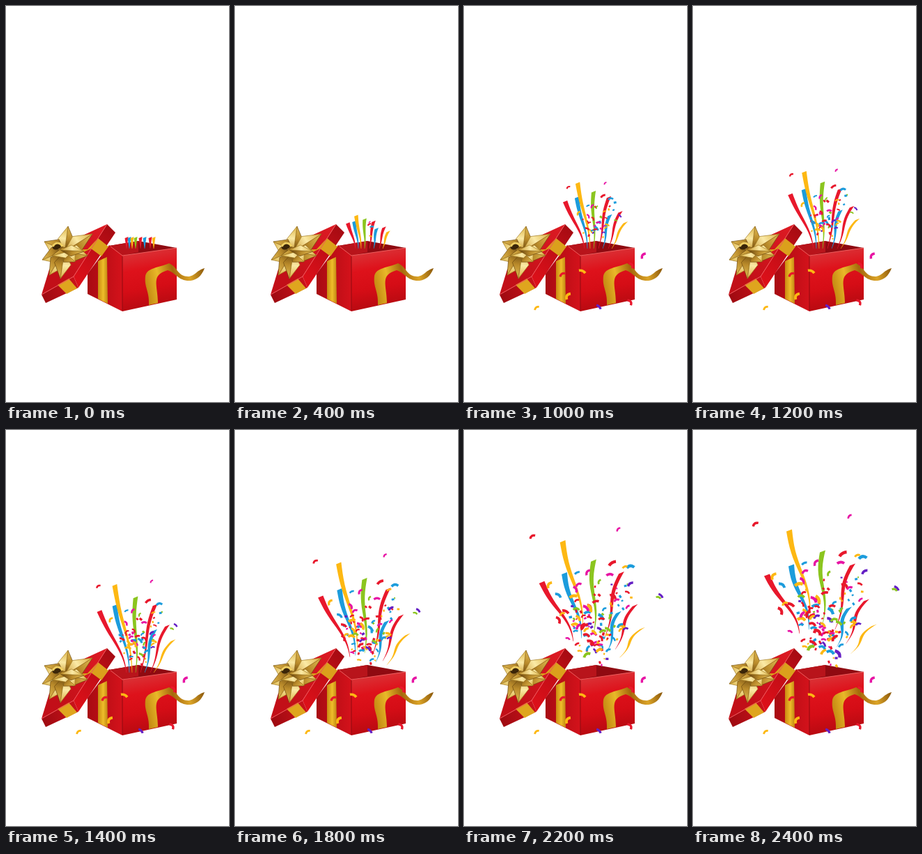
An HTML page with a canvas for the animation above (2600 ms loop, 320x568 px).

```html
<!DOCTYPE html>
<html lang="en">
<head>
<meta charset="utf-8">
<title>Gift box confetti</title>
<style>
html, body { margin: 0; width: 100%; height: 100%; overflow: hidden; background: #fff; }
canvas { display: block; }
</style>
</head>
<body>
<canvas id="stage" width="320" height="568"></canvas>
<script>
const ctx = document.getElementById('stage').getContext('2d');
const STEP = 200, STEPS = 13, LAST = STEPS - 1;
const MOUTH = { x: 188, y: 340 };
const RED = '#e8182c', YELLOW = '#fdb813', GREEN = '#8bc51f', BLUE = '#1c9cdc', PINK = '#e714a4', VIOLET = '#641fc4';
const PAPER = [RED, YELLOW, BLUE, PINK, RED, GREEN, YELLOW, RED, BLUE, PINK, VIOLET];

const mix = (a, b, u) => a + (b - a) * u;
const rnd = n => { const v = Math.sin(n * 12.9898) * 43758.5453; return v - Math.floor(v); };

function poly(fill, pts, line) {
  ctx.beginPath();
  for (let i = 0; i < pts.length; i += 2) ctx.lineTo(pts[i], pts[i + 1]);
  ctx.closePath();
  ctx.fillStyle = fill;
  ctx.fill();
  if (line) { ctx.strokeStyle = line; ctx.lineWidth = 0.7; ctx.stroke(); }
}

function edge(color, ...pts) {
  ctx.beginPath();
  for (let i = 0; i < pts.length; i += 2) ctx.lineTo(pts[i], pts[i + 1]);
  ctx.strokeStyle = color;
  ctx.lineWidth = 1;
  ctx.stroke();
}

function shade(x0, y0, x1, y1, ...stops) {
  const g = ctx.createLinearGradient(x0, y0, x1, y1);
  stops.forEach((c, i) => g.addColorStop(i / (stops.length - 1), c));
  return g;
}

function drawBox() {
  poly('#8f0a11', [148, 344, 190, 337, 245, 347, 167, 359]);
  poly('#b8141b', [148, 344, 190, 337, 190, 353, 167, 358]);
  poly(shade(117, 0, 167, 0, '#a80b12', '#d4121b'), [148, 343, 167, 358, 167, 438, 117, 413, 117, 384]);
  poly(shade(190, 350, 205, 432, '#da3539', '#de121b', '#d50d16', '#b80a11'), [167, 358, 245, 347, 245, 421, 167, 438]);
  poly(shade(132, 0, 147, 0, '#c98a10', '#eebd2a', '#b97d0e'), [132, 366, 145, 360, 146, 427, 132, 420]);
  edge('#ee5d5d', 150, 345, 167, 358, 245, 347);
  edge('#8f0a10', 167, 359, 167, 437);
  // loose ribbon on the right
  ctx.beginPath();
  ctx.moveTo(205, 429);
  ctx.bezierCurveTo(206, 408, 198, 404, 200, 387);
  ctx.bezierCurveTo(203, 375, 218, 376, 234, 369);
  ctx.bezierCurveTo(248, 376, 246, 388, 262, 388);
  ctx.bezierCurveTo(272, 387, 272, 380, 285, 376);
  ctx.bezierCurveTo(280, 388, 275, 392, 265, 394);
  ctx.bezierCurveTo(247, 395, 243, 382, 232, 379);
  ctx.bezierCurveTo(207, 386, 218, 400, 218, 426);
  ctx.closePath();
  ctx.fillStyle = shade(198, 400, 285, 382, '#c08410', '#e9b929', '#a5690c', '#dca528', '#8d5a0c');
  ctx.fill();
}

function drawLid() {
  poly(shade(70, 380, 145, 330, '#c20f18', '#dc1a23'), [145, 313, 97, 388, 51, 414, 62, 378, 108, 330]);
  poly(shade(51, 414, 100, 395, '#9e0a11', '#c9121a'), [51, 414, 97, 388, 104, 404, 57, 426]);
  poly(shade(97, 390, 155, 320, '#dc1019', '#c40e17', '#a50b12'), [97, 388, 145, 313, 157, 325, 104, 404]);
  poly('#dba01c', [88, 350, 117, 349, 132, 333, 147, 345, 137, 359, 122, 348, 96, 360]);
  poly('#dfa51e', [74, 400, 90, 391, 102, 405, 87, 413]);
  edge('#f0555a', 51, 414, 97, 388, 145, 313);
}

// a folded loop: one bright facet and one shadowed facet
function petal(cx, cy, tx, ty, w) {
  const len = Math.hypot(tx - cx, ty - cy);
  const nx = -(ty - cy) / len * w, ny = (tx - cx) / len * w;
  const mx = mix(cx, tx, 0.45), my = mix(cy, ty, 0.45);
  poly(shade(cx, cy, tx, ty, '#5e3d0c', '#b98a2a', '#e3bd55'), [cx, cy, mx + nx, my + ny, tx, ty], '#6e4a0e');
  poly(shade(cx, cy, tx, ty, '#c9982f', '#fbeaa6', '#d9ae3f'), [cx, cy, mx - nx, my - ny, tx, ty], '#a37a22');
}

function drawBow() {
  const tips = [[89, 316], [55, 338], [124, 327], [52, 364], [62, 386], [78, 391], [117, 358], [99, 367]];
  for (const [x, y] of tips) petal(84, 352, x, y, 12);
  petal(98, 350, 66, 358, 8);
  petal(78, 350, 112, 352, 8);
  ctx.fillStyle = '#3a2508';
  ctx.beginPath(); ctx.ellipse(73, 344, 7, 5, -0.5, 0, 7); ctx.fill();
  ctx.strokeStyle = '#f0cf62';
  ctx.lineWidth = 3;
  ctx.beginPath(); ctx.arc(74, 347, 7, 3.4, 6); ctx.stroke();
}

// colour, base x, and where the tip ends up
const STREAMERS = [
  [RED, 173, 106, 208],
  [BLUE, 177, 141, 194],
  [YELLOW, 181, 138, 144],
  [GREEN, 186, 186, 174],
  [RED, 193, 229, 193],
  [BLUE, 199, 224, 255],
  [RED, 207, 249, 244],
  [YELLOW, 212, 260, 280]
];

function drawStreamer([color, bx, endX, endY], k) {
  const grow = k / LAST, lift = Math.max(0, (k - 7) / 5);
  const tx = mix(bx, endX, grow), ty = mix(332, endY, grow);
  const x0 = mix(bx, endX, lift * 0.3), y0 = mix(348, endY, lift * 0.4);
  const left = [], right = [];
  for (let n = 0; n <= 16; n++) {
    const v = n / 16, w = (0.5 + v * (4.5 + k * 0.25)) / 2;
    const x = mix(x0, tx, v * (0.7 + 0.3 * v)) + Math.sin(v * 6.28) * k * 0.28;
    const y = mix(y0, ty, v);
    left.push(x - w, y + w * 0.4);
    right.unshift(x + w, y - w * 0.4);
  }
  poly(color, left.concat(right));
}

function chip(i, x, y, size) {
  const s = size * mix(0.6, 1.1, rnd(i + 0.1));
  ctx.save();
  ctx.translate(x, y);
  ctx.rotate((rnd(i + 0.5) - 0.5) * 2.4);
  ctx.strokeStyle = PAPER[i % PAPER.length];
  ctx.lineWidth = s * 0.38;
  ctx.beginPath();
  ctx.moveTo(-s / 2, s * 0.14);
  ctx.quadraticCurveTo(0, -s * mix(0.1, 0.5, rnd(i + 0.7)), s / 2, s * 0.14);
  ctx.stroke();
  ctx.restore();
}

// chips leave the box one after another and keep flying outward
function drawChips(k) {
  const count = 80;
  for (let i = 0; i < count; i++) {
    const age = k - mix(1.5, LAST, i / count);
    if (age < 0) break;
    const reach = age + 1.5;
    const vx = (rnd(i + 20) + rnd(i + 140) - 1) * 11, vy = mix(5, 19, rnd(i + 260));
    chip(i, MOUTH.x + vx * reach, MOUTH.y - vy * reach, 4 + k * 0.6);
  }
}

// chips that have dropped on and around the box
const FALLEN = [[170, 380], [104, 433], [240, 372], [141, 385], [257, 358], [194, 431], [238, 425], [149, 416]];

function drawFallen(k) {
  if (k > 4) FALLEN.forEach(([x, y], i) => chip(i + (i % 3 ? 5 : 1), x, y, 11));
}

function drawSpecks(k) {
  for (let i = 0; i < (k - 3) * 7; i++) {
    const reach = mix(8, 20 + k * 10, rnd(i + 200)), s = mix(1.5, 3.5, rnd(i + 300));
    ctx.save();
    ctx.translate(191 + (rnd(i + 400) - 0.5) * (24 + reach * 0.7), 350 - reach);
    ctx.rotate(rnd(i + 500) * 3);
    ctx.fillStyle = PAPER[i % PAPER.length];
    ctx.fillRect(-s / 2, -s / 2, s * 1.3, s);
    ctx.restore();
  }
}

function draw(k) {
  ctx.fillStyle = '#fff';
  ctx.fillRect(0, 0, 320, 568);
  drawBox();
  for (const s of STREAMERS) drawStreamer(s, k);
  drawLid();
  drawBow();
  drawSpecks(k);
  drawChips(k);
  drawFallen(k);
}

function tick(now) {
  draw(Math.floor(now / STEP) % STEPS);
  requestAnimationFrame(tick);
}
requestAnimationFrame(tick);
</script>
</body>
</html>
```
